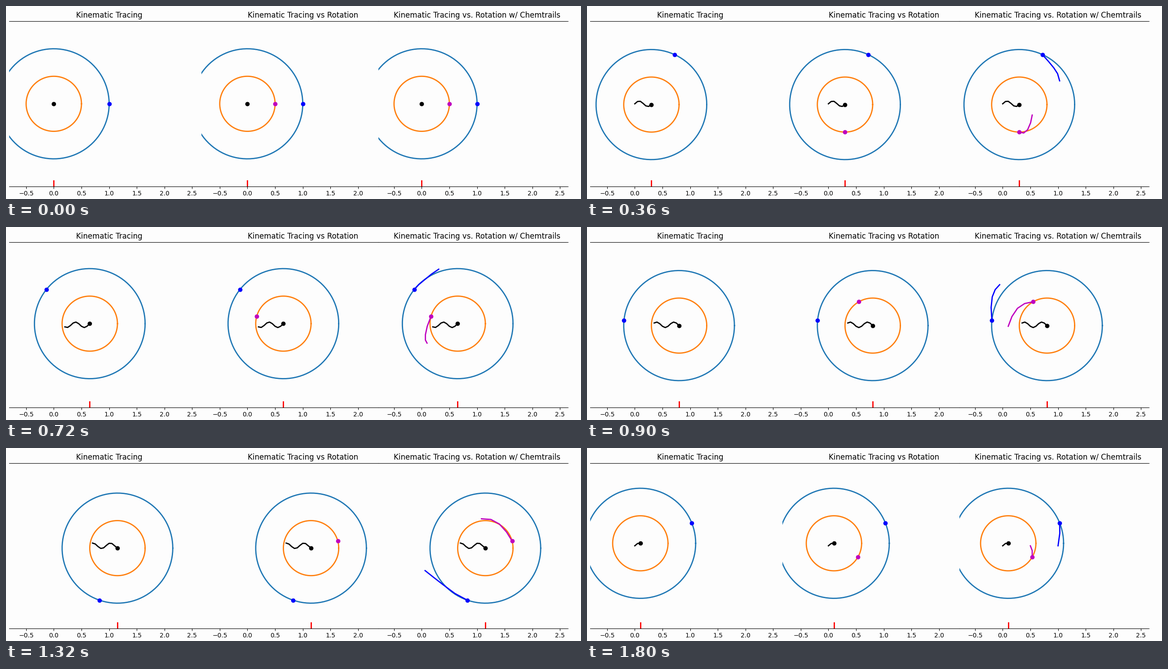
Recreate the animation shown at these times as a matplotlib script. Size 1280 by 432 pixels, loop 1860 ms.

```python
import numpy as np
import matplotlib.pyplot as plt
from matplotlib.animation import FuncAnimation

W, H, DPI = 1280, 432, 100
FRAMES, INTERVAL = 31, 60
UNIT = 123.2                 # pixels per data unit
TOP, BOTTOM = 34.1, 403.7    # shared vertical extent of the panels
STEPS, RATE = 30, 1.09       # steps per pass, steps per drawn frame
CENTER_TRAIL, ORBIT_TRAIL = 10, 5

# left edge, right edge, pixel of x = 0, title
PANELS = [
    (7, 434.5, 106.4, "Kinematic Tracing"),
    (434.5, 829, 537.4, "Kinematic Tracing vs Rotation"),
    (829, 1251, 925.4, "Kinematic Tracing vs. Rotation w/ Chemtrails"),
]

plt.rcParams["font.family"] = "DejaVu Sans"
theta = np.linspace(0, 2 * np.pi, 100)


def center(i):
    return 0.05 * i, 0.05 * np.sin(i)


def orbit(i, radius, period):
    x, y = center(i)
    a = 2 * np.pi * i / period
    return x + radius * np.cos(a), y + radius * np.sin(a)


def outer(i):
    return orbit(i, 1.0, 33)


def inner(i):
    return orbit(i, 0.5, -24)


def last_steps(step, count):
    return np.arange(max(0, step - count + 1), step + 1)


class Panel:
    def __init__(self, fig, left, right, zero, title, spinner, trails):
        lo, hi = (left - zero) / UNIT, (right - zero) / UNIT
        ax = fig.add_axes([left / W, 1 - BOTTOM / H,
                           (right - left) / W, (BOTTOM - TOP) / H])
        ax.patch.set_visible(False)
        ax.set(xlim=(lo, hi), ylim=(-1.5, 1.5), yticks=[])
        ax.set_xticks(np.arange(-0.5, hi, 0.5))
        ax.spines[["left", "right"]].set_visible(False)
        ax.set_title(title, fontsize=12, x=(1 - lo) / (hi - lo), y=1)

        def line(style, **kw):
            return ax.plot([], [], style, lw=2, **kw)[0]

        self.rings = [(line("C0"), 1.0), (line("C1"), 0.5)]
        self.mark = line("r")
        self.paths = [(line("k"), center, CENTER_TRAIL)]
        self.dots = [(line("ko"), center), (line("bo"), outer)]
        if spinner:
            self.dots.append((line("mo"), inner))
        if trails:
            self.paths += [(line("b"), outer, ORBIT_TRAIL),
                           (line("m"), inner, ORBIT_TRAIL)]

    def draw(self, step):
        x, y = center(step)
        for ring, r in self.rings:
            ring.set_data(x + r * np.cos(theta), y + r * np.sin(theta))
        self.mark.set_data([x, x], [-1.5, -1.4])
        for path, func, count in self.paths:
            path.set_data(*func(last_steps(step, count)))
        for dot, func in self.dots:
            px, py = func(step)
            dot.set_data([px], [py])


fig = plt.figure(figsize=(W / DPI, H / DPI), dpi=DPI, facecolor="#fdfdfd")
panels = [Panel(fig, *spec, spinner=n > 0, trails=n > 1)
          for n, spec in enumerate(PANELS)]


def update(frame):
    step = int(frame * RATE) % STEPS
    for panel in panels:
        panel.draw(step)
    return []


anim = FuncAnimation(fig, update, frames=FRAMES, interval=INTERVAL,
                     init_func=lambda: update(0), repeat=True, repeat_delay=0)
plt.show()
```
